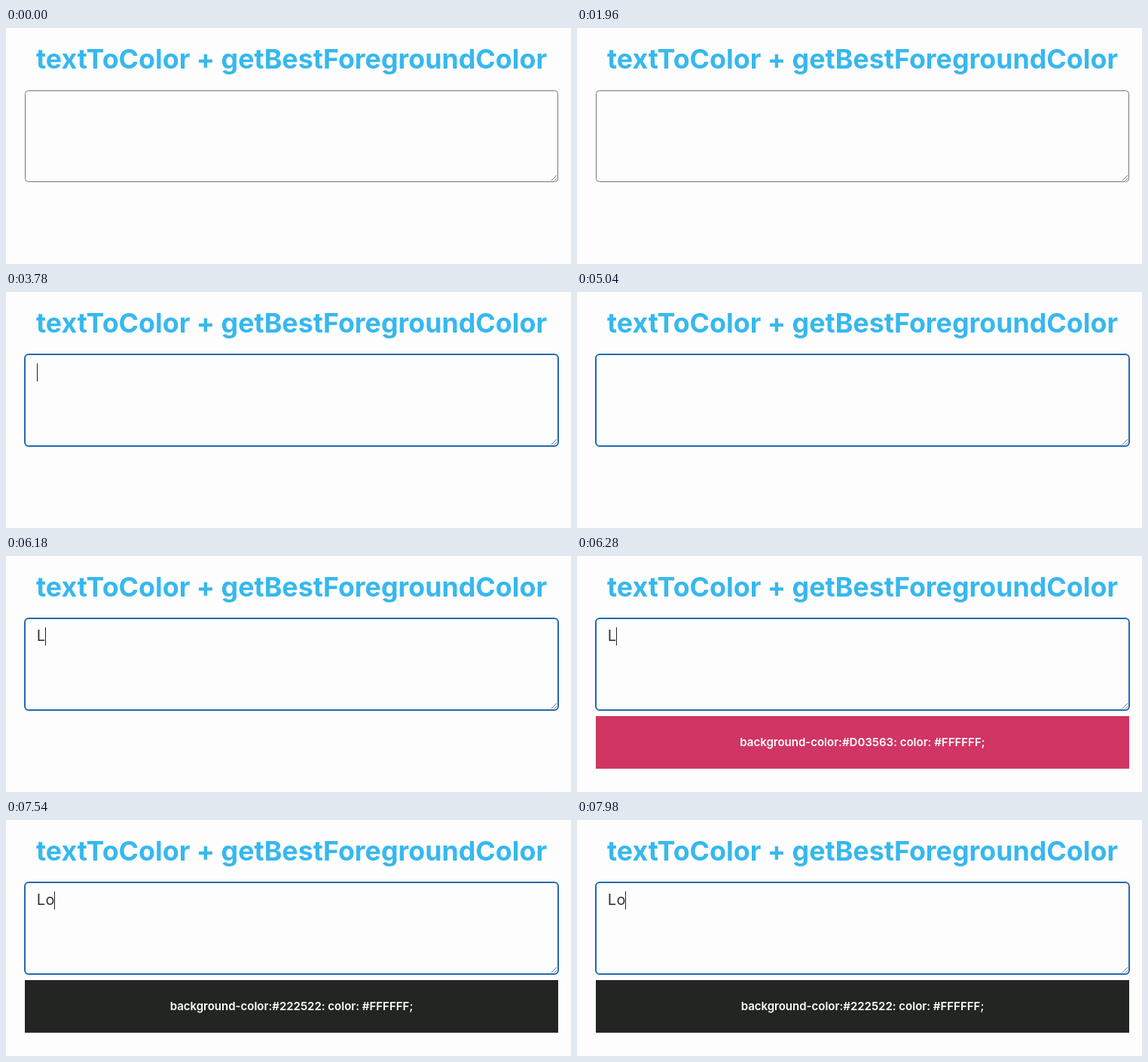
Recreate the animation shown at these times as an HTML page. Size 750 by 314 pixels, loop 8 s.

```html
<!DOCTYPE html>
<html lang="en">
<head>
<meta charset="utf-8">
<title>textToColor</title>
<style>
  html, body { margin: 0; width: 100%; height: 100%; overflow: hidden; background: #fdfdfd; }
  svg { display: block; width: 750px; height: 314px; font-family: Inter, sans-serif; }
  .title { font-size: 35.8px; font-weight: 700; fill: #37b8ee; text-anchor: middle; }
  .idle { fill: none; stroke: #76767a; }
  .ring { fill: #fdfdfd; stroke: #2469ae; stroke-width: 2; }
  .grip { stroke: #77777a; }
  .typed { font-size: 20px; fill: #333; }
  .caret { fill: #222; }
  .style { font-size: 15px; font-weight: 600; fill: #fff; text-anchor: middle; }

  /* hard state changes on one 8 s clock */
  .idle, .ring, .caret, .key1, .key2, .red, .dark { animation: 8s step-end infinite; }
  .idle { animation-name: idle; }
  .ring { animation-name: focus; }
  .caret { animation-name: blink; }
  .key1 { animation-name: key1; }
  .key2 { animation-name: key2; }
  .red { animation-name: red; }
  .dark { animation-name: dark; }

  @keyframes idle { 0% { opacity: 1; } 47.25%, 100% { opacity: 0; } }
  @keyframes focus { 0% { opacity: 0; } 47.25%, 100% { opacity: 1; } }
  @keyframes key1 { 0% { opacity: 0; } 73.5%, 100% { opacity: 1; } }
  @keyframes key2 { 0% { opacity: 0; } 89.25%, 100% { opacity: 1; } }
  @keyframes red { 0% { opacity: 0; } 78.5% { opacity: 1; } 94.25%, 100% { opacity: 0; } }
  @keyframes dark { 0% { opacity: 0; } 94.25%, 100% { opacity: 1; } }
  @keyframes blink {
    0% { opacity: 0; transform: none; }
    47.25% { opacity: 1; transform: none; }
    63% { opacity: 0; transform: none; }
    73.5% { opacity: 1; transform: translateX(11px); }
    89.25%, 100% { opacity: 1; transform: translateX(23px); }
  }
</style>
</head>
<body>
<svg viewBox="0 0 750 314">
  <text class="title" x="379" y="54">textToColor + getBestForegroundColor</text>

  <rect class="idle" x="25.5" y="83.5" width="707" height="121" rx="4"/>
  <rect class="ring" x="25" y="83" width="708" height="122" rx="5"/>
  <path class="grip" d="M724 203l7-7M728 203l3-3"/>

  <g class="typed">
    <text class="key1" x="40.8" y="113">L</text>
    <text class="key2" x="52.4" y="113">o</text>
  </g>
  <rect class="caret" x="41" y="95" width="1" height="24"/>

  <g class="red">
    <rect x="25" y="213" width="708" height="70" fill="#d03563"/>
    <text class="style" x="379" y="253">background-color:#D03563: color: #FFFFFF;</text>
  </g>
  <g class="dark">
    <rect x="25" y="213" width="708" height="70" fill="#222522"/>
    <text class="style" x="379" y="253">background-color:#222522: color: #FFFFFF;</text>
  </g>
</svg>
</body>
</html>
```
